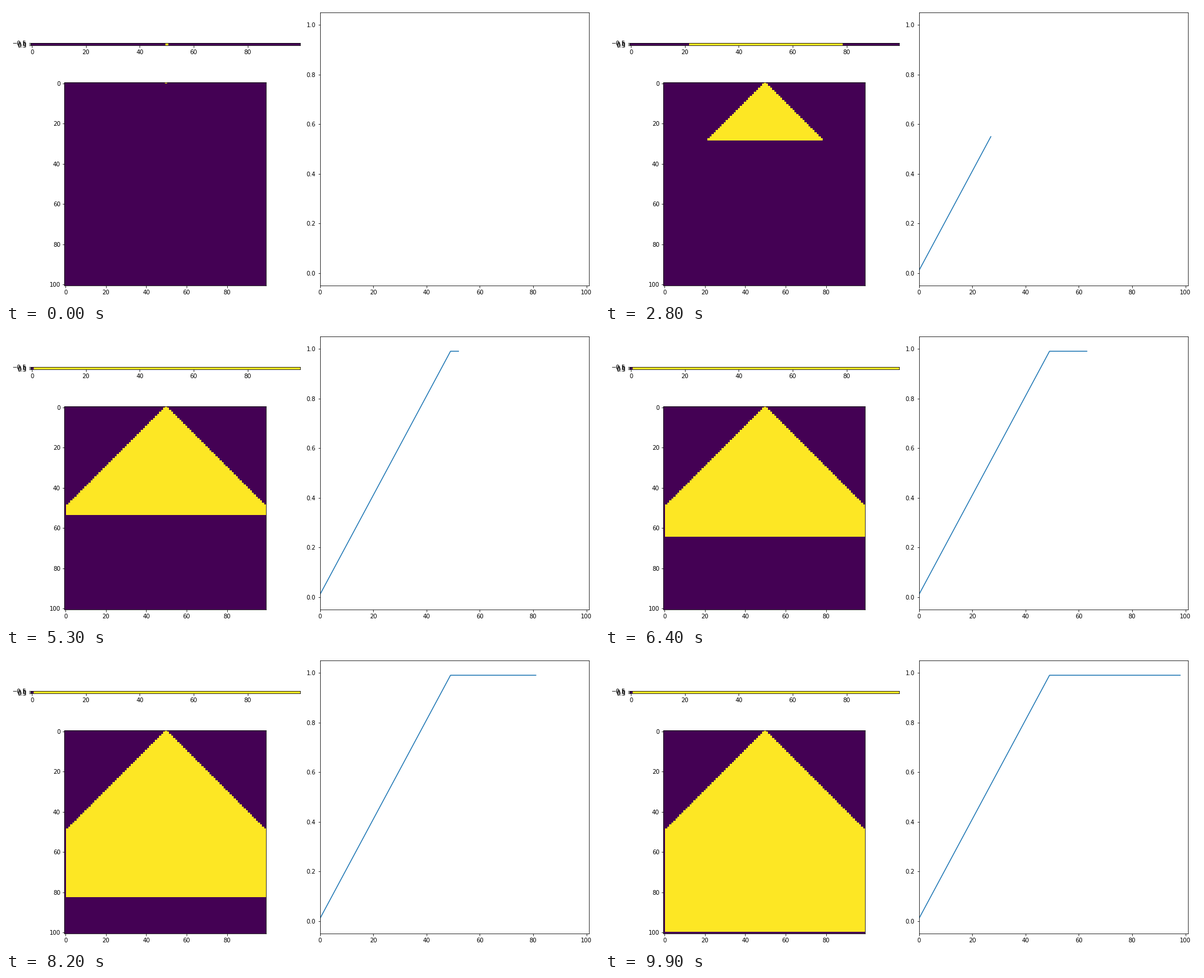
A matplotlib script that plays this animation: 1008 px wide and 504 px high, repeating every 10 s.

```python
import numpy as np
import matplotlib.pyplot as plt
from matplotlib.animation import FuncAnimation

WIDTH, STEPS = 100, 100
INTERVAL = 100

# Each cell is infected one step after its neighbour; column 0 stays clear.
rows = np.arange(STEPS + 1)[:, None]
cols = np.arange(WIDTH)[None, :]
history = ((np.abs(cols - WIDTH // 2) <= rows) & (cols > 0)).astype(float)
density = history.mean(axis=1)

plt.rcParams.update({"font.family": "DejaVu Sans", "font.size": 10})
fig = plt.figure(figsize=(14, 7), dpi=72)
ax_state = plt.subplot2grid((4, 2), (0, 0))
ax_space = plt.subplot2grid((4, 2), (1, 0), rowspan=3)
ax_plot = plt.subplot2grid((4, 2), (0, 1), rowspan=4)

look = dict(cmap="viridis", vmin=0, vmax=1, interpolation="nearest")
state = ax_state.imshow(history[:1], **look)
space = ax_space.imshow(np.zeros_like(history), **look)
ax_state.set_yticks([-0.5, 0, 0.5])
for ax in (ax_state, ax_space):
    ax.set_xticks(range(0, WIDTH, 20))
ax_space.set_yticks(range(0, STEPS + 1, 20))

line, = ax_plot.plot([], [], color="C0", lw=1.5)
ax_plot.set_xlim(0, STEPS + 1)
ax_plot.set_ylim(-0.05, 1.05)
fig.tight_layout()


def update(step):
    state.set_data(history[step:step + 1])
    space.set_data(np.where(rows <= step, history, 0))
    line.set_data(np.arange(step), density[:step])
    return state, space, line


anim = FuncAnimation(fig, update, frames=STEPS, interval=INTERVAL,
                     init_func=lambda: update(0), repeat=True,
                     repeat_delay=0, blit=False)
plt.show()
```
